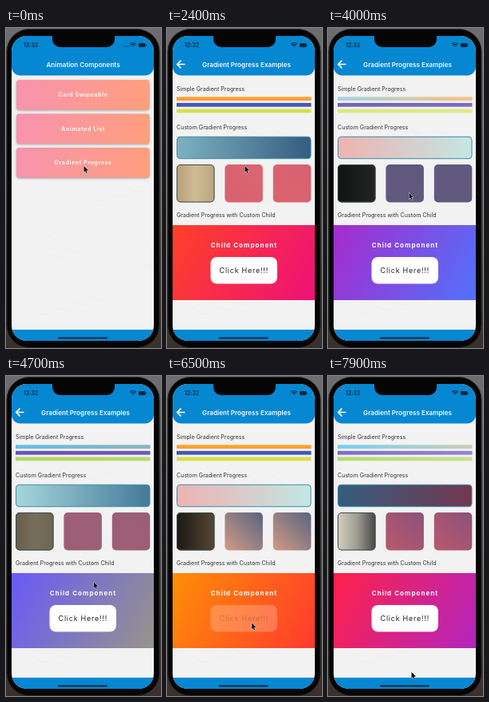
Recreate the animation shown at these times as an HTML page with a canvas. Size 194 by 401 pixels, loop 8000 ms.

```html
<!DOCTYPE html>
<html lang="en">
<head>
<meta charset="utf-8">
<title>Gradient progress demo</title>
<style>
html, body { margin: 0; width: 100%; height: 100%; overflow: hidden; background: #000; }
canvas { display: block; width: 194px; height: 401px; }
</style>
</head>
<body>
<canvas id="stage"></canvas>
<script>
const W = 194, H = 401, LOOP = 8000, MOUNT = 1184;
const L = 7, R = 185, TOP = 10, BOTTOM = 392;
const BLUE = '#0687d2';
const canvas = document.getElementById('stage');
const ctx = canvas.getContext('2d');
const dpr = window.devicePixelRatio || 1;
canvas.width = W * dpr;
canvas.height = H * dpr;

const clamp = v => Math.max(0, Math.min(1, v));
const lerp = (a, b, k) => a + (b - a) * k;
const rgb = c => Array.isArray(c) ? c : [1, 3, 5].map(i => parseInt(c.slice(i, i + 2), 16));
const mix = (a, b, k) => rgb(a).map((v, i) => lerp(v, rgb(b)[i], k));
const css = c => `rgb(${rgb(c).map(Math.round).join(',')})`;

// Colour at a cyclic position in a palette
function cycle(list, p) {
  const n = list.length, i = Math.floor(p);
  return mix(list[i % n], list[(i + 1) % n], p - i);
}
const pair = (list, p) => [cycle(list, p), cycle(list, p + 1)];

// Finds the surrounding keys and the share between them
function between(times, t) {
  let i = 0;
  while (i < times.length - 2 && t >= times[i + 1]) i++;
  return [i, clamp((t - times[i]) / (times[i + 1] - times[i]))];
}
const TIMES = [1300, 2400, 4000, 5400, 6500, 7900];
function keyed(keys, t) {
  const [i, k] = between(TIMES, t);
  const a = keys[i], b = keys[i + 1];
  return a.map((c, j) => mix(c, b[j], k));
}

const CHILD = ['#ffa500', '#ff4b1c', '#ff0a62', '#8a35f0', '#3f86ff'];
const CUSTOM = ['#e63946', '#f1faee', '#a8dadc', '#457b9d', '#1d3557'];
const BARS = [
  [['#1687cc', '#1687cc'], ['#ff9f2e', '#ff9f2e'], ['#a5d2e6', '#f8c283'],
   ['#1fabf0', '#1fabf0'], ['#ffa02c', '#ffa02c'], ['#76cff2', '#cbcdb6']],
  [['#5a38a6', '#5a38a6'], ['#4856b2', '#4856b2'], ['#7262bd', '#7d6ec4'],
   ['#6a3fb6', '#6a3fb6'], ['#4459b2', '#4459b2'], ['#7f6dcb', '#9585d2']],
  [['#79b944', '#79b944'], ['#d3df48', '#d3df48'], ['#d9e87c', '#e0ea88'],
   ['#8fc650', '#8fc650'], ['#d4e047', '#d4e047'], ['#b5da72', '#c7e18a']]
];
const SQUARES = [
  [['#11191c', '#1c2a2f', '#2b3d42'], ['#b7a077', '#cfbc95', '#b9a680'],
   ['#111414', '#1a1b1b', '#252424'], ['#bca67d', '#d2c09a', '#b9a680'],
   ['#1c1815', '#392f23', '#554833'], ['#d4cfbf', '#a09e95', '#464746']],
  [['#4c557f', '#74507f'], ['#d7616f', '#dc6570'], ['#62597e', '#5f587c'],
   ['#d6636f', '#dc6872'], ['#d19b84', '#596480'], ['#b8596e', '#8d527a']],
  [['#4c557f', '#74507f'], ['#dc636c', '#d66270'], ['#60587d', '#615a7e'],
   ['#da6670', '#d4616f'], ['#d19b84', '#596480'], ['#b8596e', '#8d527a']]
];

function box(x, y, w, h, r, fill) {
  ctx.beginPath();
  ctx.roundRect(x, y, w, h, r);
  if (fill) { ctx.fillStyle = fill; ctx.fill(); }
}
function grad(x0, y0, x1, y1, stops) {
  const g = ctx.createLinearGradient(x0, y0, x1, y1);
  stops.forEach((c, i) => g.addColorStop(i / (stops.length - 1), css(c)));
  return g;
}
function text(s, x, y, size, weight, color, align = 'left', gap = 0) {
  ctx.font = `${weight} ${size}px Inter, "Open Sans", sans-serif`;
  ctx.letterSpacing = gap + 'px';
  ctx.textAlign = align;
  ctx.fillStyle = color;
  ctx.fillText(s, x, y);
  ctx.letterSpacing = '0px';
}

// Faint circuit traces behind the content
function backdrop() {
  ctx.fillStyle = '#f2f2f2';
  ctx.fillRect(L, TOP, R - L, BOTTOM - TOP);
  ctx.strokeStyle = '#ebebeb';
  ctx.lineWidth = 0.7;
  for (let i = 0; i < 17; i++) {
    const x = L + (i * 47) % 165, y = 64 + (i * 71) % 290, d = 12 + (i * 13) % 26;
    ctx.beginPath();
    ctx.moveTo(x, y);
    ctx.lineTo(x + d, y + d * 0.8);
    ctx.lineTo(x + d + 14, y + d * 0.8 + 2);
    ctx.stroke();
  }
}
function frame(title, x) {
  box(L, TOP, R - L, 49.5, [0, 0, 11, 11], BLUE);
  text(title, x, 48.5, 8.15, 600, '#f4faff', 'center');
  ctx.fillStyle = BLUE;
  ctx.fillRect(L, 378, R - L, 16);
}

function home(t) {
  backdrop();
  frame('Animation Components', 96.5);
  const k = clamp(t / 1300);
  const colors = [mix('#f893ae', '#f2405f', k), mix('#ff9f7d', '#f2405f', k)];
  ['Card Swipeable', 'Animated List', 'Gradient Progress'].forEach((s, i) => {
    const y = 65 + i * 42.5;
    ctx.save();
    ctx.shadowColor = 'rgba(0,0,0,.35)';
    ctx.shadowBlur = 3 * dpr;
    ctx.shadowOffsetY = dpr;
    box(13, y, 166.5, 37.5, 4, grad(13, y, 180, y + 20, colors));
    ctx.restore();
    text(s, 96.5, y + 21.3, 7, 700, '#fff4ef', 'center', 0.6);
  });
}

function square(i, t) {
  const x = 12 + i * 60.4, y = 171, s = 47.5;
  const colors = keyed(SQUARES[i], t);
  const fill = i ? grad(x, y + s, x + s, y, colors) : grad(x, y, x + s, y, colors);
  box(x, y, s, s, 5, fill);
  if (i) return;
  box(x + 0.5, y + 0.5, s - 1, s - 1, 4.5);
  ctx.strokeStyle = '#3c4a4a';
  ctx.lineWidth = 1;
  ctx.stroke();
}

function examples(t) {
  backdrop();
  frame('Gradient Progress Examples', 99.5);
  ctx.strokeStyle = '#fff';
  ctx.lineWidth = 1.7;
  ctx.beginPath();
  ctx.moveTo(22.5, 45.5);
  ctx.lineTo(13, 45.5);
  ctx.moveTo(17.5, 40.7);
  ctx.lineTo(12.8, 45.5);
  ctx.lineTo(17.5, 50.3);
  ctx.stroke();

  text('Simple Gradient Progress', 12, 78.5, 7.1, 400, '#333');
  text('Custom Gradient Progress', 12, 127, 7.1, 400, '#333');
  text('Gradient Progress with Custom Child', 12, 237.3, 7.1, 400, '#333');
  BARS.forEach((keys, i) => {
    ctx.fillStyle = grad(12, 0, 180, 0, keyed(keys, t));
    ctx.fillRect(12, 86.3 + i * 7.6, 168.5, 4.8);
  });

  const age = Math.max(0, t - MOUNT);
  box(12.5, 136.3, 167.5, 27.4, 4, grad(12, 0, 180, 0, pair(CUSTOM, age / 500)));
  ctx.strokeStyle = '#3c8aa8';
  ctx.lineWidth = 1;
  ctx.stroke();
  for (let i = 0; i < 3; i++) square(i, t);

  ctx.fillStyle = grad(L, 247, R, 341, pair(CHILD, Math.max(0, age - 60) / 1000));
  ctx.fillRect(L, 247, R - L, 94);
  text('Child Component', 96.5, 275.3, 8, 700, '#fff', 'center', 1.05);
  const press = clamp((t - 6300) / 150) * (1 - clamp((t - 6600) / 250));
  ctx.save();
  ctx.globalAlpha = 1 - 0.78 * press;
  box(54.5, 287, 83.5, 33.5, 8, '#fff');
  text('Click Here!!!', 96.3, 307, 9, 400, '#222', 'center', 0.75);
  ctx.restore();
}

function status(t) {
  box(58, 0, 78, 24, [0, 0, 10, 10], '#050505');
  text('12:32', 22, 24, 7, 600, '#06263b');
  ctx.fillStyle = '#06263b';
  if (t < 2000) for (let i = 0; i < 4; i++) ctx.fillRect(147 + i * 1.9, 22.5, 1, 1);
  ctx.strokeStyle = '#06263b';
  ctx.lineWidth = 1.2;
  for (let r = 1.5; r < 6; r += 2) {
    ctx.beginPath();
    ctx.arc(159, 24, r, -Math.PI * 0.75, -Math.PI * 0.25);
    ctx.stroke();
  }
  box(166, 19, 8.5, 5, 1.3, '#06263b');
  ctx.fillRect(175, 20.5, 0.8, 2);
  box(65, 387.5, 62, 2, 1, '#082c43');
}

const PATH_T = [0, 3000, 4000, 5400, 6300, 6700, 7900];
const PATH = [[97.5, 173], [97.5, 173], [101.5, 206.5], [118, 309.5], [106, 309.5], [106, 309.5], [104.5, 371]];
function cursor(t) {
  const [i, k] = between(PATH_T, t), e = k * k * (3 - 2 * k);
  ctx.save();
  ctx.translate(lerp(PATH[i][0], PATH[i + 1][0], e), lerp(PATH[i][1], PATH[i + 1][1], e));
  ctx.beginPath();
  [[0, 0], [0, 7.8], [1.8, 6.2], [3, 9], [4.2, 8.5], [3, 5.7], [5.5, 5.6]].forEach(p => ctx.lineTo(...p));
  ctx.closePath();
  ctx.strokeStyle = '#eee';
  ctx.lineWidth = 1;
  ctx.stroke();
  ctx.fillStyle = '#111';
  ctx.fill();
  ctx.restore();
}

function draw(t) {
  ctx.setTransform(dpr, 0, 0, dpr, 0, 0);
  ctx.fillStyle = grad(0, 0, 0, H, ['#6e6e6e', '#555351', '#3a302b']);
  ctx.fillRect(0, 0, W, H);
  box(1, 1.5, 191, 399, 28, '#050505');
  ctx.strokeStyle = '#262626';
  ctx.lineWidth = 1;
  ctx.stroke();

  ctx.save();
  box(L, TOP, R - L, BOTTOM - TOP, 19);
  ctx.clip();
  // Critically damped push transition
  const s = Math.max(0, t - MOUNT) / 1000 * 18.26;
  const p = t > 1900 ? 1 : 1 - Math.exp(-s) * (1 + s);
  const w = R - L;
  if (p < 1) {
    ctx.save();
    ctx.translate(-0.3 * w * p, 0);
    home(t);
    ctx.restore();
    ctx.fillStyle = `rgba(0,0,0,${0.1 * p})`;
    ctx.fillRect(L, TOP, w, BOTTOM - TOP);
  }
  if (p > 0) {
    ctx.save();
    ctx.translate(w * (1 - p), 0);
    ctx.beginPath();
    ctx.rect(L, TOP, w, BOTTOM - TOP);
    ctx.clip();
    examples(t);
    ctx.restore();
  }
  status(t);
  ctx.restore();
  cursor(t);
}

const start = performance.now();
function tick() {
  draw((performance.now() - start) % LOOP);
  requestAnimationFrame(tick);
}
tick();
</script>
</body>
</html>
```
